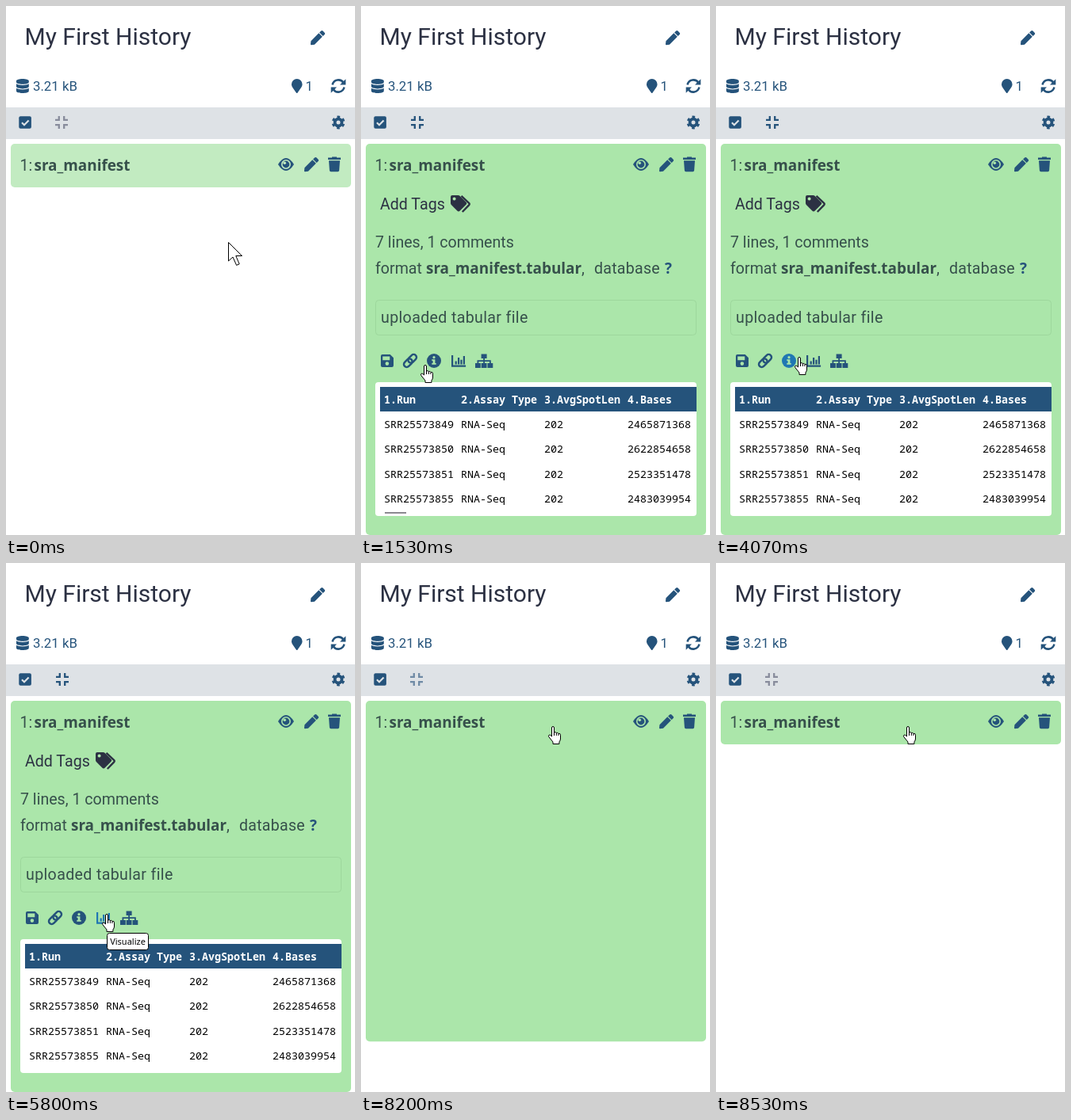
Write an HTML page that moves like this. It is 440x668 px and loops after 9.07 s.

```html
<!DOCTYPE html>
<html lang="en">
<head>
<meta charset="utf-8">
<title>History panel</title>
<style>
html, body { margin: 0; width: 100%; height: 100%; overflow: hidden; background: #fff; }
svg { display: block; --bg: #c2ebc1; }
text { font: 19.6px Roboto, sans-serif; fill: #36504b; white-space: pre; }
text.b { font: bold 18.9px "Noto Sans", sans-serif; }
text.blue { fill: #25537b; }
text.dark { fill: #2c3143; }
#peek text { font: 13.33px "Noto Sans Mono", monospace; fill: #000; }
#peek .head text { font-weight: bold; fill: #fff; }
#tip text { font: 11px "Noto Sans", sans-serif; fill: #000; text-anchor: middle; }
.ico { fill: #25537b; }
.line { fill: none; stroke: #25537b; }
.hot .ico { fill: #2077b3; }
.hot .line { stroke: #2077b3; }
.hole { fill: var(--bg); }
</style>
</head>
<body>
<svg width="440" height="668" viewBox="0 0 440 668">
  <defs>
    <path id="pen" d="M290.7 93.2l128 128-278 278-114 12.6C11.3 513.5-1.6 500.6.1 485.3l12.7-114.2zM497.9 74.2l-60-60c-18.8-18.8-49.2-18.8-68 0l-56.5 56.5 128 128 56.5-56.5c18.8-18.8 18.8-49.2 0-68z"/>
    <path id="turn" d="M411.6 99.5A7.6 7.6 0 0 1 425.5 97" stroke-width="2.5"/>
    <path id="turnTip" d="M428.3 92.3v7.3H421z"/>
    <clipPath id="clip"><rect id="clipBox" x="6" y="174" width="429" height="55"/></clipPath>
    <clipPath id="peekClip"><rect x="18" y="475" width="405" height="169" rx="4"/></clipPath>
  </defs>

  <!-- header -->
  <text class="dark" x="23.5" y="49" style="font-size:30px">My First History</text>
  <use href="#pen" class="ico" transform="translate(384 31) scale(.0355)"/>
  <path class="ico" transform="translate(13 92) scale(.0353)" d="M448 73v46C448 159 348 192 224 192S0 159 0 119V73C0 33 100 0 224 0s224 33 224 73zM448 176v103C448 319 348 352 224 352S0 319 0 279V176c48 33 136 48.6 224 48.6S400 209 448 176zM448 336v103C448 479 348 512 224 512S0 479 0 439V336c48 33 136 48.6 224 48.6S400 369 448 336z"/>
  <text class="blue" x="34" y="107" style="font-size:16.8px">3.21 kB</text>
  <path class="ico" transform="translate(360 92) scale(.0353)" d="M172 502C27 291 0 269 0 192a192 192 0 0 1 384 0c0 77-27 99-172 310-10 13-30 13-40 0z"/>
  <text class="blue" x="377.5" y="107" style="font-size:16.8px">1</text>
  <g id="sync"><use href="#turn" class="line"/><use href="#turnTip" class="ico"/></g>
  <use href="#sync" transform="rotate(180 419 101)"/>

  <!-- toolbar -->
  <path fill="#dee2e6" d="M0 128h440v40H0z"/>
  <rect class="ico" x="16.3" y="139.2" width="15.6" height="15.6" rx="2"/>
  <path d="M20 147.3l3 3 5.6-5.8" fill="none" stroke="#dee2e6" stroke-width="2.2"/>
  <path id="shrink" fill="none" stroke-width="2.3" d="M62 143.8h4.8V139M78 143.8h-4.8V139M62 150.2h4.8v4.8M78 150.2h-4.8v4.8"/>
  <circle class="line" cx="419" cy="147" r="4.4" stroke-width="3.8"/>
  <circle class="line" cx="419" cy="147" r="7" stroke-width="2.8" stroke-dasharray="3.6 3.73" stroke-dashoffset="-1.9"/>

  <!-- dataset card -->
  <rect id="card" class="hole" x="6" y="174" width="429" height="55" rx="5"/>
  <text x="17.5" y="208">1:</text>
  <text class="b" x="35.5" y="208">sra_manifest</text>
  <path class="ico" d="M343 200Q353 184 363 200Q353 216 343 200z"/>
  <circle cx="353" cy="200" r="5.2" fill="none" stroke="var(--bg)" stroke-width="1.6"/>
  <circle class="hole" cx="351.3" cy="198.3" r="1.8"/>
  <use href="#pen" class="ico" transform="translate(376 191) scale(.0355)"/>
  <path class="ico" d="M411 190.5h6v1h5v2.5h-16v-2.5h5zM407 195.3h14l-.9 12.3q-.1 1.6-1.7 1.6h-8.8q-1.6 0-1.7-1.6z"/>

  <g id="details" clip-path="url(#clip)">
    <text class="dark" x="24" y="257">Add Tags</text>
    <path fill="#2c3143" fill-rule="evenodd" d="M113 241q0-2 2-2h7.5q1.2 0 2 .8l8 8q1.5 1.5 0 3l-8 8q-1.5 1.5-3 0l-7.7-7.7q-.8-.8-.8-2zM115.6 243.6a2 2 0 1 0 4 0a2 2 0 1 0-4 0z"/>
    <path fill="none" stroke="#2c3143" stroke-width="2.4" d="M126.5 239.8l9.6 9q1.2 1.2 0 2.6l-8.3 8.6"/>
    <text x="18" y="305">7 lines, 1 comments</text>
    <text x="18" y="338">format</text>
    <text class="b" x="82" y="338">sra_manifest.tabular</text>
    <text x="278" y="338">,</text>
    <text x="294" y="338" letter-spacing=".25">database</text>
    <text class="b blue" x="383" y="338">?</text>
    <rect x="18.5" y="371.5" width="404" height="44" rx="4" fill="none" stroke="#9dd79c"/>
    <text x="25" y="400" letter-spacing=".35">uploaded tabular file</text>

    <g class="btn">
      <path class="ico" fill-rule="evenodd" d="M25 442q0-2 2-2h9.7l4.3 4.3V454q0 2-2 2H27q-2 0-2-2zM27.3 442.5v4.7h9v-4.7zM30.6 451.6a2.3 2.3 0 1 0 4.6 0a2.3 2.3 0 1 0-4.6 0z"/>
    </g>
    <g class="btn">
      <g class="line" stroke-width="2.5" transform="rotate(-45 62 448)">
        <rect x="52.2" y="444.4" width="12" height="7.2" rx="3.6"/>
        <rect x="59.8" y="444.4" width="12" height="7.2" rx="3.6"/>
      </g>
    </g>
    <g class="btn">
      <circle class="ico" cx="92" cy="448" r="9"/>
      <circle class="hole" cx="92" cy="443.7" r="1.6"/>
      <path class="hole" d="M89.3 446.3h4.1v4.6h1.3v1.8h-5.4v-1.8h1.3v-2.8h-1.3z"/>
    </g>
    <g class="btn">
      <path class="line" stroke-width="2.2" d="M115.1 441v13.6h17M119.7 448.5v4M123.1 444v8.5M126.5 446.8v5.7M129.9 442v10.5"/>
    </g>
    <g class="btn">
      <path class="ico" d="M151.6 439.5h7v5.6h-7zM144 451h6.8v6H144zM151.7 451h6.8v6h-6.8zM159.5 451h6.8v6h-6.8z"/>
      <path class="line" stroke-width="1.8" d="M155.1 444v7M147.4 451v-2.9h15.5v2.9"/>
    </g>

    <g id="peek" clip-path="url(#peekClip)">
      <path fill="#fff" d="M18 475h405v169H18z"/>
      <path fill="#25537b" d="M24 481h399v31H24z"/>
      <path id="bar" stroke="#8b8990" stroke-width="2" d="M30 640h27"/>
    </g>
  </g>

  <g id="tip">
    <rect x=".5" y=".5" height="21" rx="3" fill="#fff" stroke="#000"/>
    <text y="15"></text>
  </g>
  <g fill="#fff" stroke="#000">
    <path id="arrow" d="M.5.5V24L6 19l4.6 10.4 3.6-1.6L9.8 17.5h7.7z"/>
    <g id="hand">
      <path d="M4.5 13V2q0-1.5 1.5-1.5T7.5 2v6q1.8-1.2 2.8.6 1.8-1 2.6.8 2.6-.7 2.6 1.8V16q0 2-1.6 4v2.5H6V20L1 13.8q-1.2-2 .2-2.6 1.6-.6 3.3 1.8z"/>
      <path d="M7.5 8v4M10.3 8.6V12M12.9 9.4V12"/>
    </g>
  </g>
</svg>
<script>
const LOOP = 9070, TICK = 0.015;              // ticks per ms
const $ = id => document.getElementById(id);
const svg = document.querySelector('svg');
const buttons = [...document.querySelectorAll('.btn')];
const buttonEdges = [22, 47, 77, 108, 138, 172];

// start, end, x, y of each pointer move
const start = [275, 296];
const moves = [
  [0, 400, 206, 201], [1067, 1533, 75, 453], [1533, 1667, 62, 460],
  [1667, 2067, 38, 446], [2733, 2933, 52, 441], [3600, 4067, 98.5, 442.5],
  [5000, 5267, 121, 443], [6400, 6733, 149, 443], [7533, 8000, 236, 206]
];
// show, hide, x, y, width, label
const tips = [
  [2530, 2790, 44, 470, 62, 'Download'],
  [3460, 3660, 58, 465, 61, 'Copy Link'],
  [4590, 5060, 104, 467, 85, 'Dataset Details'],
  [5790, 6460, 127, 467, 53, 'Visualize'],
  [7260, 7595, 155, 467, 111, 'Show Related Items']
];
const rows = [
  ['1.Run', '2.Assay Type', '3.AvgSpotLen', '4.Bases'],
  ['SRR25573849', 'RNA-Seq', '202', '2465871368'],
  ['SRR25573850', 'RNA-Seq', '202', '2622854658'],
  ['SRR25573851', 'RNA-Seq', '202', '2523351478'],
  ['SRR25573855', 'RNA-Seq', '202', '2483039954']
];
const columns = [29, 126, 231, 336];
rows.forEach((row, r) => {
  const cells = row.map((s, c) => `<text x="${columns[c]}" y="${501.5 + r * 31.4}">${s}</text>`);
  $('peek').insertAdjacentHTML('beforeend', `<g class="${r ? '' : 'head'}">${cells.join('')}</g>`);
});

const clamp = p => Math.max(0, Math.min(1, p));
const smooth = p => (p = clamp(p), p * p * (3 - 2 * p));
const show = (el, on) => el.setAttribute('visibility', on ? 'visible' : 'hidden');
const place = (el, x, y) => el.setAttribute('transform', `translate(${x} ${y})`);

function pointer(t) {
  let [x, y] = start;
  for (const [from, to, nx, ny] of moves) {
    const p = smooth((t - from) / (to - from));
    x += (nx - x) * p;
    y += (ny - y) * p;
  }
  return [Math.round(x), Math.round(y)];
}

function openness(t) {
  if (t < 799) return 0;
  return t < 8199 ? smooth((t - 673) / 350) : 1 - smooth((t - 8104) / 400);
}

function draw(now) {
  const t = Math.round(Math.floor((now % LOOP + 4) * TICK) / TICK);
  const [x, y] = pointer(t);
  const over = y + 2 < 229 || t > 600;
  svg.style.setProperty('--bg', t >= 600 ? '#abe6aa' : over ? '#b7e9b5' : '#c2ebc1');

  show($('arrow'), !over);
  show($('hand'), over);
  place($('arrow'), x + 5, y + 2);
  place($('hand'), x, y);

  const height = 55 + 439 * openness(t);
  $('card').setAttribute('height', height);
  $('clipBox').setAttribute('height', height);
  const open = t >= 799 && t < 8199;
  show($('details'), open);
  $('bar').setAttribute('opacity', 1 - clamp((t - 3600) / 300));
  $('shrink').setAttribute('stroke', open ? '#25537b' : t >= 8199 && t < 8260 ? '#6f8aa5' : '#888c9c');
  place($('shrink'), open ? 1 : 0, 0);

  const onBar = y + 3 > 438 && y + 3 < 455;
  buttons.forEach((b, i) => b.classList.toggle('hot',
    onBar && x + 6 >= buttonEdges[i] && x + 6 < buttonEdges[i + 1]));

  const tip = tips.find(([from, to]) => t >= from && t < to);
  show($('tip'), tip);
  if (tip) {
    const [, , tx, ty, width, label] = tip;
    const [box, text] = $('tip').children;
    place($('tip'), tx, ty);
    box.setAttribute('width', width - 1);
    text.setAttribute('x', width / 2);
    text.textContent = label;
  }
}

const began = performance.now();
function frame() {
  draw(performance.now() - began);
  requestAnimationFrame(frame);
}
frame();
</script>
</body>
</html>
```
